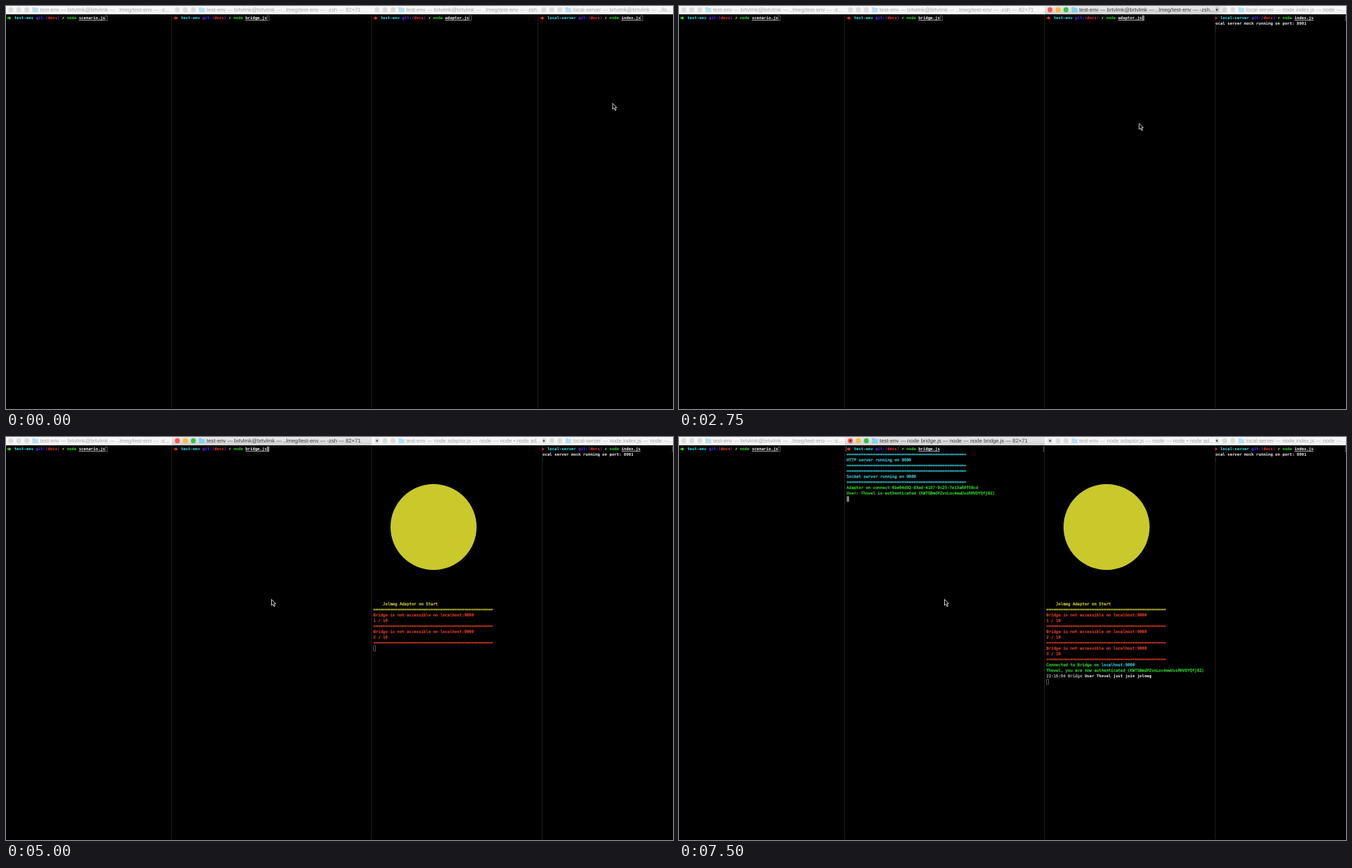
An HTML page with a canvas that plays this animation: 961 px wide and 582 px high, repeating every 8 s.

```html
<!DOCTYPE html>
<html lang="en">
<head>
<meta charset="utf-8">
<title>Terminals</title>
<style>
html, body { margin: 0; width: 100%; height: 100%; overflow: hidden; background: #000; }
canvas { display: block; }
</style>
</head>
<body>
<canvas id="stage" width="961" height="582"></canvas>
<script>
const ctx = document.getElementById('stage').getContext('2d');
ctx.textRendering = 'geometricPrecision';

const LOOP = 8000, HEIGHT = 582, BAR = 12;
const COL = 3.443, ROW = 8;
const MONO = '5.72px "DejaVu Sans Mono", monospace';
const SANS = '7.8px "Liberation Sans", sans-serif';
const C = {
  red: '#dc3c26', green: '#2fd02a', yellow: '#c9c92c', cyan: '#35c6d4', white: '#f2f2f2', grey: '#9a9a9a',
  hotRed: '#fc391f', hotGreen: '#31e722', hotYellow: '#eaec23', hotBlue: '#5833ff', hotCyan: '#2ce6f0'
};
const RULE = '='.repeat(50);
const USER = 'brtvlmk@brtvlmk';
const TOKEN = '(KWTGBmdPZvnLoc4ewUxsRHVDYQfj82)';
const SHELL = `test-env — ${USER} — ..lmeg/test-env — `;

// Pointer tip positions, each held until the next time
const POINTER = [
  [0, 873.5, 140], [2250, 867, 142], [2500, 662.5, 169],
  [4500, 625, 173], [4750, 401, 233], [5000, 382, 234]
];

function polygon(points) {
  ctx.beginPath();
  points.forEach(([x, y]) => ctx.lineTo(x, y));
  ctx.closePath();
}

function print(x, row, segments) {
  const y = 19.4 + row * ROW;
  let col = 0;
  ctx.lineWidth = 0.3;
  for (const [text, color, bold, underline] of segments) {
    ctx.font = (bold ? 'bold ' : '') + MONO;
    ctx.fillStyle = ctx.strokeStyle = color;
    [...text].forEach((ch, i) => {
      if (ch === ' ') return;
      const left = x + (col + i) * COL;
      ctx.fillText(ch, left, y);
      // Thin outline keeps the regular weight legible at this size
      if (!bold) ctx.strokeText(ch, left, y);
    });
    if (underline) ctx.fillRect(x + col * COL, y + 0.8, text.length * COL, 0.7);
    col += text.length;
  }
}

function promptArrow(x, color) {
  ctx.fillStyle = color;
  polygon([[0, 16.6], [2.4, 16.6], [2.4, 14.7], [5.6, 17.4], [2.4, 20.1], [2.4, 18.2], [0, 18.2]]
    .map(([px, py]) => [x + 0.3 + px, py]));
  ctx.fill();
}

function prompt(x, folder, file, arrow = C.hotRed) {
  promptArrow(x, arrow);
  print(x, 0, [
    ['   ' + folder, C.hotCyan, true], [' git:(', C.hotBlue, true], ['docs', C.hotRed, true],
    [')', C.hotBlue, true], [' ✗ ', C.hotYellow, true], ['node ', C.green, true], [file, C.white, true, true]
  ]);
}

function cursor(x, col, row, focused) {
  const left = x + col * COL, top = 13.5 + row * ROW;
  if (focused) {
    ctx.fillStyle = '#858585';
    ctx.fillRect(left, top, COL, 8);
  } else {
    ctx.strokeStyle = '#777';
    ctx.lineWidth = 0.7;
    ctx.strokeRect(left + 0.4, top + 0.4, COL - 0.6, 7.2);
  }
}

function bracket(x, side) {
  ctx.strokeStyle = '#888';
  ctx.lineWidth = 0.7;
  ctx.beginPath();
  ctx.moveTo(x + side, 14);
  ctx.lineTo(x, 14);
  ctx.lineTo(x, 20.5);
  ctx.lineTo(x + side, 20.5);
  ctx.stroke();
}

function disc(x, y, r, color) {
  ctx.fillStyle = color;
  ctx.beginPath();
  ctx.arc(x, y, r, 0, Math.PI * 2);
  ctx.fill();
}

function titleBar(x, width, origin, title, focused, running) {
  const shade = ctx.createLinearGradient(0, 0, 0, BAR);
  shade.addColorStop(0, focused ? '#e9e9e9' : '#f7f7f7');
  shade.addColorStop(1, focused ? '#d2d2d2' : '#f4f4f4');
  ctx.fillStyle = shade;
  ctx.fillRect(x, 0, width, BAR);
  const lights = focused ? ['#fb5650', '#fcbb3a', '#32c546'] : ['#dcdcdc', '#dcdcdc', '#dcdcdc'];
  lights.forEach((color, i) => disc(origin + 6.9 + i * 11.5, 5.4, 3.6, color));
  if (running) disc(origin + 6.9, 5.4, 1.3, focused ? '#7c1512' : '#555');

  ctx.fillStyle = focused ? '#62c5ee' : '#a8dcf3';
  ctx.fillRect(origin + 38, 2, 4, 2);
  ctx.fillStyle = focused ? '#7ed3f5' : '#b5e2f6';
  ctx.fillRect(origin + 38, 3, 8.5, 6);

  ctx.font = SANS;
  ctx.fillStyle = focused ? '#3c3c3c' : '#a6a6a6';
  ctx.fillText(title, origin + 49, 8.2);
}

function pane(x, right, origin, title, focused, running, content) {
  ctx.save();
  ctx.beginPath();
  ctx.rect(x, 0, right - x, HEIGHT);
  ctx.clip();
  ctx.fillStyle = '#000';
  ctx.fillRect(x, 0, right - x, HEIGHT);
  content(origin + 1.6);
  titleBar(x, right - x, origin, title, focused, running);
  ctx.restore();
}

function edge(x) {
  ctx.fillStyle = '#1d1d1d';
  ctx.fillRect(x, BAR, 1, HEIGHT - BAR - 1);
}

function scenarioPane() {
  pane(0, 239, 0, SHELL + '-z...', false, false, x => {
    prompt(x, 'test-env', 'scenario.js', C.hotGreen);
    cursor(x, 41, 0, false);
  });
}

function bridgePane(t) {
  const focused = t >= 5000, started = t >= 6000, ready = t >= 6250, joined = t >= 6750;
  let title = SHELL + '-zsh — 82×71';
  if (started) title = 'test-env — node bridge.js — node — 82×71';
  if (ready) title = 'test-env — node bridge.js — node — node bridge.js — 82×71';
  pane(239, 527, 240, title, focused, ready, x => {
    prompt(x, 'test-env', 'bridge.js');
    if (started) {
      bracket(240.6, 1.2);
      bracket(525.4, -1.2);
    }
    if (ready) {
      [RULE, 'HTTP server running on 8000', RULE, RULE, 'Socket server running on 9000', RULE]
        .forEach((line, i) => print(x, i + 1, [[line, C.cyan]]));
    }
    if (joined) {
      print(x, 7, [['Adaptor on connect 6be04d92-83ad-4197-9c25-7e13a60f58cd', C.green]]);
      print(x, 8, [['User: Thovel is authenticated ' + TOKEN, C.green]]);
    }
    if (started) cursor(x, 0, joined ? 9 : ready ? 7 : 1, focused);
    else cursor(x, 39, 0, focused);
  });
}

function adaptorPane(t, right) {
  const focused = t >= 2750 && t < 5000, started = t >= 4000, joined = t >= 6750;
  const attempts = [4250, 5000, 6000].filter(at => t >= at).length;
  let title = SHELL + '-zsh...';
  if (started) title = 'test-env — node adaptor.js — node — node adaptor.js...';
  if (attempts) title = 'test-env — node adaptor.js — node — node • node ad...';
  pane(527, right, 527.7, title, focused, started, x => {
    if (!started) {
      prompt(x, 'test-env', 'adaptor.js');
      cursor(x, 40, 0, focused);
      return;
    }
    disc(616, 130, 62, C.yellow);
    print(x, 28, [['    Jolmeg Adaptor on Start', C.yellow]]);
    print(x, 29, [[RULE, C.yellow]]);
    for (let i = 0; i < attempts; i++) {
      const row = 30 + i * 3;
      print(x, row, [['Bridge is not accessible on localhost:9000', C.red]]);
      print(x, row + 1, [[`${i + 1} / 10`, C.red]]);
      print(x, row + 2, [[RULE, C.red]]);
    }
    if (joined) {
      print(x, 39, [['Connected to Bridge on ', C.green], ['localhost:9000', C.cyan]]);
      print(x, 40, [['Thovel, you are now authenticated ' + TOKEN, C.green]]);
      print(x, 41, [['22:16:04 Bridge ', C.grey], ['User Thovel just join jolmeg', C.white, true]]);
    }
    cursor(x, 0, joined ? 42 : 30 + attempts * 3, focused);
  });
}

function serverPane(t) {
  const focused = t >= 250 && t < 2750, started = t >= 1500, ready = t >= 1750;
  const title = started ? 'local-server — node index.js — node —...' : `local-server — ${USER} — ../lo...`;
  pane(767, 961, 768, title, focused, ready, x => {
    prompt(x, 'local-server', 'index.js');
    if (started) {
      bracket(768.6, 1.2);
      bracket(960.4, -1.2);
    }
    if (ready) print(x, 1, [['Local server mock running on port: 8001', C.white, true]]);
    if (started) cursor(x, 0, ready ? 2 : 1, focused);
    else cursor(x, 42, 0, focused);
  });
}

function pointer(t) {
  const [, x, y] = POINTER.filter(([at]) => t >= at).pop();
  ctx.save();
  ctx.translate(x + 0.5, y + 0.5);
  polygon([[0, 0], [0, 8.6], [2, 6.9], [3.5, 10.3], [5, 9.6], [3.5, 6.3], [6.1, 6.3]]);
  ctx.fillStyle = '#000';
  ctx.fill();
  ctx.strokeStyle = '#e8e8e8';
  ctx.lineWidth = 0.9;
  ctx.stroke();
  ctx.restore();
}

function draw(t) {
  const adaptorInFront = t >= 2750;
  const seam = adaptorInFront ? 773 : 767;
  ctx.fillStyle = '#000';
  ctx.fillRect(0, 0, 961, HEIGHT);
  scenarioPane();
  serverPane(t);
  if (adaptorInFront && t < 5000) {
    const shadow = ctx.createLinearGradient(seam, 0, seam + 18, 0);
    shadow.addColorStop(0, 'rgba(0,0,0,.12)');
    shadow.addColorStop(1, 'rgba(0,0,0,0)');
    ctx.fillStyle = shadow;
    ctx.fillRect(seam, 0, 18, BAR);
  }
  adaptorPane(t, seam);
  bridgePane(t);
  [238, 526, seam - 1].forEach(edge);
  pointer(t);
}

const start = performance.now();
function tick() {
  draw((performance.now() - start) % LOOP);
  requestAnimationFrame(tick);
}
tick();
</script>
</body>
</html>
```
